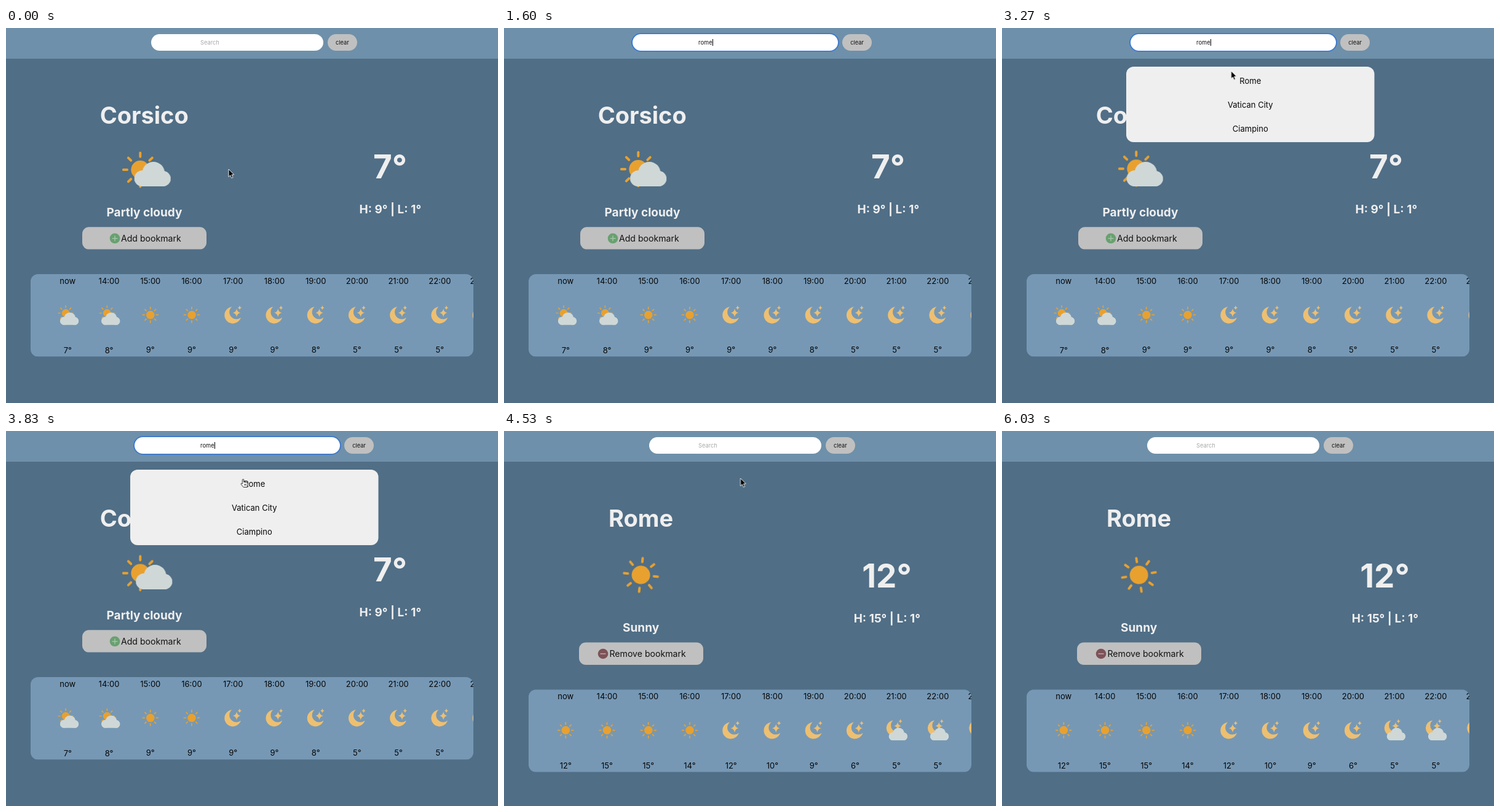
These frames come from a looping animation (800 by 611 pixels, 6100 ms). An HTML page:

```html
<!DOCTYPE html>
<html lang="en">
<head>
<meta charset="utf-8">
<title>Weather search</title>
<style>
html, body { margin: 0; width: 100%; height: 100%; overflow: hidden; background: #506e86; }
body, text { font-family: Inter, "Liberation Sans", sans-serif; }
#stage { position: relative; width: 800px; height: 611px; overflow: hidden; }
#stage > svg { position: absolute; left: 0; top: 0; }
text { text-anchor: middle; }
.title { font-weight: 700; font-size: 38px; fill: #efefef; }
.sub { font-weight: 700; font-size: 19px; fill: #efefef; }
.temp { font-weight: 700; font-size: 53px; fill: #efefef; }
.label { font-size: 14.1px; fill: #111; text-anchor: start; }
.hour, .city { font-size: 13px; fill: #060606; }
.heading { font-weight: 500; font-size: 16.8px; fill: #f4f4f4; }
.sun { fill: #e8a12f; stroke: #e8a12f; }
.moon { fill: #eebf70; }
.cloud { fill: #cfd8d7; }
.bone { fill: #cdc9ca; }

header { position: absolute; left: 0; top: 0; width: 793px; height: 49.5px; padding-left: 7px;
  display: flex; justify-content: center; background: #6e90aa; }
.field, .clear { margin-top: 9.5px; height: 27px; border-radius: 13.5px; flex: none; }
.field { width: 280px; background: #fff; animation: grow 6.1s infinite, ring 6.1s step-end infinite; }
.clear { width: 48.7px; margin-left: 6.7px; background: #c0c0c0; color: #111;
  font-size: 9.3px; line-height: 27px; text-align: center; }
.typed, .hint { position: absolute; left: 316px; top: 9.5px; height: 27px; font-size: 9.3px; line-height: 27px; }
.hint { color: #a9a9a9; animation: hint 6.1s step-end infinite; }
.typed { display: flex; align-items: center; color: #111; }
.typed span { animation: 6.1s step-end infinite; }
.typed i { width: 1px; height: 11px; background: #000; animation: caret 6.1s step-end infinite; }

.before, .loading, .after, .search, .found, .arrow, .beam, .hand { animation: 6.1s step-end infinite; }
.before { animation-name: before; }
.loading { animation-name: loading; }
.after { animation-name: after; }
.search { animation-name: search; }
.found { animation-name: found; }
.arrow { animation-name: arrow; }
.beam { animation-name: beam; }
.hand { animation-name: hand; }
.spin { animation: spin 6.1s linear infinite; }
.bob { animation: bob 6.1s linear infinite; }
.drift { animation: drift 6.1s linear infinite; }
.pointer { animation: pointer 6.1s ease-in-out infinite; }

@keyframes grow {
  0%, 13.61% { width: 280px; animation-timing-function: ease; }
  18.52%, 62.95% { width: 334.5px; animation-timing-function: ease; }
  67.87%, 100% { width: 280px; }
}
@keyframes ring {
  0%, 62.95% { box-shadow: none; }
  13.61% { box-shadow: 0 0 0 1.8px #3c78d0; }
}
@keyframes hint { 0%, 65.08%, 100% { opacity: 1; } 21.8% { opacity: 0; } }
@keyframes key1 { 0%, 65.08%, 100% { font-size: 0; } 21.8% { font-size: 9.3px; } }
@keyframes key2 { 0%, 65.08%, 100% { font-size: 0; } 23.11% { font-size: 9.3px; } }
@keyframes key3 { 0%, 65.08%, 100% { font-size: 0; } 24.59% { font-size: 9.3px; } }
@keyframes key4 { 0%, 65.08%, 100% { font-size: 0; } 26.07% { font-size: 9.3px; } }
@keyframes caret {
  0%, 17.9%, 34%, 45.9%, 62.95%, 100% { opacity: 0; }
  13.77%, 21.8%, 38%, 50% { opacity: 1; }
}
@keyframes before { 0% { opacity: 1; } 65.08%, 100% { opacity: 0; } }
@keyframes loading { 0%, 70.98%, 100% { opacity: 0; } 65.08% { opacity: 1; } }
@keyframes after { 0% { opacity: 0; } 70.98%, 100% { opacity: 1; } }
@keyframes search { 0%, 37.7%, 100% { opacity: 0; } 26.56% { opacity: 1; } }
@keyframes found { 0%, 65.08%, 100% { opacity: 0; } 37.7% { opacity: 1; } }
@keyframes arrow { 0%, 47.8%, 67.2%, 100% { opacity: 1; } 8.9%, 55% { opacity: 0; } }
@keyframes beam { 0%, 21.8%, 47.8%, 100% { opacity: 0; } 8.9%, 45.9% { opacity: 1; } }
@keyframes hand { 0%, 67.2%, 100% { opacity: 0; } 55% { opacity: 1; } }
@keyframes spin { from { transform: rotate(3.6deg); } to { transform: rotate(491.6deg); } }
@keyframes bob {
  0% { transform: translateY(230.9px); }
  2.79%, 32.79%, 62.79% { transform: translateY(231.6px); }
  17.79%, 47.79%, 77.79%, 100% { transform: translateY(227.8px); }
}
@keyframes drift {
  0% { transform: translateX(208.7px); }
  2.79%, 32.79%, 62.79% { transform: translateX(211.3px); }
  17.79%, 47.79%, 77.79%, 100% { transform: translateX(197.3px); }
}
@keyframes pointer {
  0%, .5% { transform: translate(362px, 230px); }
  9.8%, 46% { transform: translate(325px, 31px); }
  53.6% { transform: translate(372.5px, 70px); }
  57%, 76.2% { transform: translate(384.5px, 77px); }
  85.7% { transform: translate(470px, 24px); animation-timing-function: linear; }
  89.3%, 100% { transform: translate(560px, -20px); }
}
</style>
</head>
<body>
<div id="stage">
  <header><div class="field"></div><div class="clear">clear</div></header>
  <div class="hint">Search</div>
  <div class="typed"><span style="animation-name:key1">r</span><span style="animation-name:key2">o</span><span style="animation-name:key3">m</span><span style="animation-name:key4">e</span><i></i></div>

  <svg width="800" height="611" viewBox="0 0 800 611">
    <defs>
      <g id="sun" class="sun">
        <circle r="15" stroke="none"/>
        <g id="rays" stroke-width="4" stroke-linecap="round"></g>
      </g>
      <g id="cloud" class="cloud">
        <rect y="15" width="59" height="25" rx="12.5"/>
        <circle cx="13" cy="27" r="13"/>
        <circle cx="31" cy="18.3" r="18.3"/>
        <circle cx="46.5" cy="27.5" r="12.5"/>
      </g>
      <path id="star" d="M0-7Q1-1 6.5 0 1 1 0 7-1 1-6.5 0-1-1 0-7Z"/>
      <g id="moon" class="moon">
        <path d="M-2-13.5A14 14 0 1 0 13 4.5 11.7 11.7 0 0 1-2-13.5Z"/>
        <use href="#star" x="6" y="-3.5"/>
        <use href="#star" transform="translate(11 -12) scale(.52)"/>
      </g>
      <linearGradient id="sheen" x2="0" y2="1">
        <stop stop-color="#7397bb"/><stop offset="1" stop-color="#7599b2"/>
      </linearGradient>
      <clipPath id="strip"><rect x="40" y="401" width="720" height="134.5" rx="12"/></clipPath>
    </defs>

    <g class="before">
      <text class="title" x="224.7" y="156">Corsico</text>
      <g class="bob"><use href="#sun" x="218.3"/></g>
      <g class="drift"><use href="#cloud" y="218"/></g>
      <text class="sub" x="225" y="306.7">Partly cloudy</text>
      <text class="temp" x="624.5" y="244.5">7°</text>
      <text class="sub" x="624.8" y="301.7">H: 9° | L: 1°</text>
      <rect x="124" y="324.3" width="202" height="36.3" rx="11" fill="#c0c0c0"/>
      <circle cx="177" cy="342.8" r="8.3" fill="#69a070"/>
      <path d="M172.5 342.8h9M177 338.3v9" stroke="#a9cdad" stroke-width="1.2"/>
      <text class="label" x="187" y="348">Add bookmark</text>
      <g id="hoursBefore" clip-path="url(#strip)"></g>
    </g>

    <g class="loading">
      <rect x="40" y="321" width="720" height="134.5" rx="12" fill="url(#sheen)"/>
      <text class="heading" x="400" y="553">3-day forecast</text>
      <rect x="40.5" y="570.5" width="719" height="80" rx="12" fill="#8097a3" stroke="#eef2f4" stroke-width="1.3"/>
      <g id="bones" class="bone"></g>
    </g>

    <g class="after">
      <text class="title" x="222.5" y="156">Rome</text>
      <g transform="translate(222.6 234.5)"><g class="spin"><use href="#sun"/></g></g>
      <text class="sub" x="222.6" y="327">Sunny</text>
      <text class="temp" x="622.5" y="254.5">12°</text>
      <text class="sub" x="622.8" y="311.7">H: 15° | L: 1°</text>
      <rect x="122" y="344.6" width="202" height="36.3" rx="11" fill="#c0c0c0"/>
      <circle cx="161" cy="363" r="8.3" fill="#7d5257"/>
      <path d="M156.5 363h9" stroke="#c9b6b8" stroke-width="1.3"/>
      <text class="label" x="171.5" y="368.2">Remove bookmark</text>
      <g transform="translate(0 20.2)"><g id="hoursAfter" clip-path="url(#strip)"></g></g>
    </g>

    <g class="search">
      <rect x="202" y="63" width="403.5" height="119" rx="12" fill="#efefef"/>
      <g id="searchBones" class="bone"></g>
    </g>
    <g class="found">
      <rect x="202" y="63" width="403.5" height="123" rx="12" fill="#efefef"/>
      <text class="city" x="403.8" y="90.5">Rome</text>
      <text class="city" x="403.8" y="130">Vatican City</text>
      <text class="city" x="403.8" y="169">Ciampino</text>
    </g>

    <g class="pointer">
      <path class="arrow" d="M0 0V12.5L2.8 9.9 4.8 14.5 7 13.5 5 9H8.8Z" fill="#000" stroke="#fff" stroke-width=".9"/>
      <path class="beam" d="M-3.5-6Q-.5-6 0-4.5 .5-6 3.5-6M0-4.5V5M-3.5 6.5Q-.5 6.5 0 5 .5 6.5 3.5 6.5M-2 2H2" fill="none" stroke="#111" stroke-width="1.2"/>
      <path class="hand" d="M0 9V2.8Q0 1.5 1.1 1.5T2.2 2.8V6L8 7.2Q9 7.5 8.8 9L8 12.5V14.5H1.5L-2.2 9.8Q-2.6 8.2-1.2 8.4Z M3.5 9v3M5.5 9v3" fill="#fff" stroke="#111" stroke-width=".9"/>
    </g>
  </svg>
</div>
<script>
const fill = (id, markup) => { document.getElementById(id).innerHTML = markup; };
const range = n => [...Array(n).keys()];
const bone = (x, y, w, h) => `<rect x="${x}" y="${y}" width="${w}" height="${h}" rx="3"/>`;
const use = (id, x, y, scale) =>
  `<use href="#${id}" transform="translate(${x} ${y}) scale(${scale})"/>`;
const columnX = i => 100.3 + 67.23 * i;

const smallCloud = x => use('cloud', x - 12.3, 463.4, .51);
const icons = {
  sun: x => use('sun', x, 467.4, .45),
  moon: x => use('moon', x, 467.4, .97),
  sunCloud: x => use('sun', x - 3.2, 464.5, .43) + smallCloud(x),
  moonCloud: x => use('moon', x - 3.5, 463.5, .9) + smallCloud(x)
};

function hours(kinds, temps) {
  const columns = temps.map((temp, i) => {
    const x = columnX(i), kind = kinds[i];
    const shift = kind.endsWith('Cloud') ? .6 : 0;
    const label = i ? `${13 + i}:00` : 'now';
    return `<text class="hour" x="${x}" y="${417.3 - shift}">${label}</text>` + icons[kind](x) +
      `<text class="hour" x="${x}" y="${529.4 + shift}">${temp}°</text>`;
  });
  return '<rect x="40" y="401" width="720" height="134.5" fill="#7698b5"/>' + columns.join('');
}

const repeat = (...runs) => runs.flatMap(([kind, n]) => Array(n).fill(kind));

fill('rays', range(8).map(i => `<path d="M0-21.3V-27.5" transform="rotate(${i * 45})"/>`).join(''));
fill('hoursBefore', hours(repeat(['sunCloud', 2], ['sun', 2], ['moon', 7]),
  [7, 8, 9, 9, 9, 9, 8, 5, 5, 5, 5]));
fill('hoursAfter', hours(repeat(['sun', 4], ['moon', 4], ['moonCloud', 3]),
  [12, 15, 15, 14, 12, 10, 9, 6, 5, 5, 5]));
fill('searchBones', [72, 110, 148].map(y => bone(336.5, y, 134.5, 24.7)).join(''));
fill('bones',
  bone(126, 104, 202, 40.5) + bone(180, 158, 94, 94) + bone(180, 266.3, 94, 13.5) +
  bone(600, 154.5, 54, 54) + bone(580, 222.5, 94, 20.3) +
  bone(135.5, 590, 54, 13.5) + bone(380, 576.5, 40.3, 40.3) + bone(610.5, 590, 54, 13.5) +
  range(10).map(i => {
    const x = columnX(i) - 20.2;
    return bone(x, 340.5, 40.4, 13.5) + bone(x, 368, 40.4, 40.4) + bone(x, 422.5, 40.4, 13.5);
  }).join(''));
</script>
</body>
</html>
```
